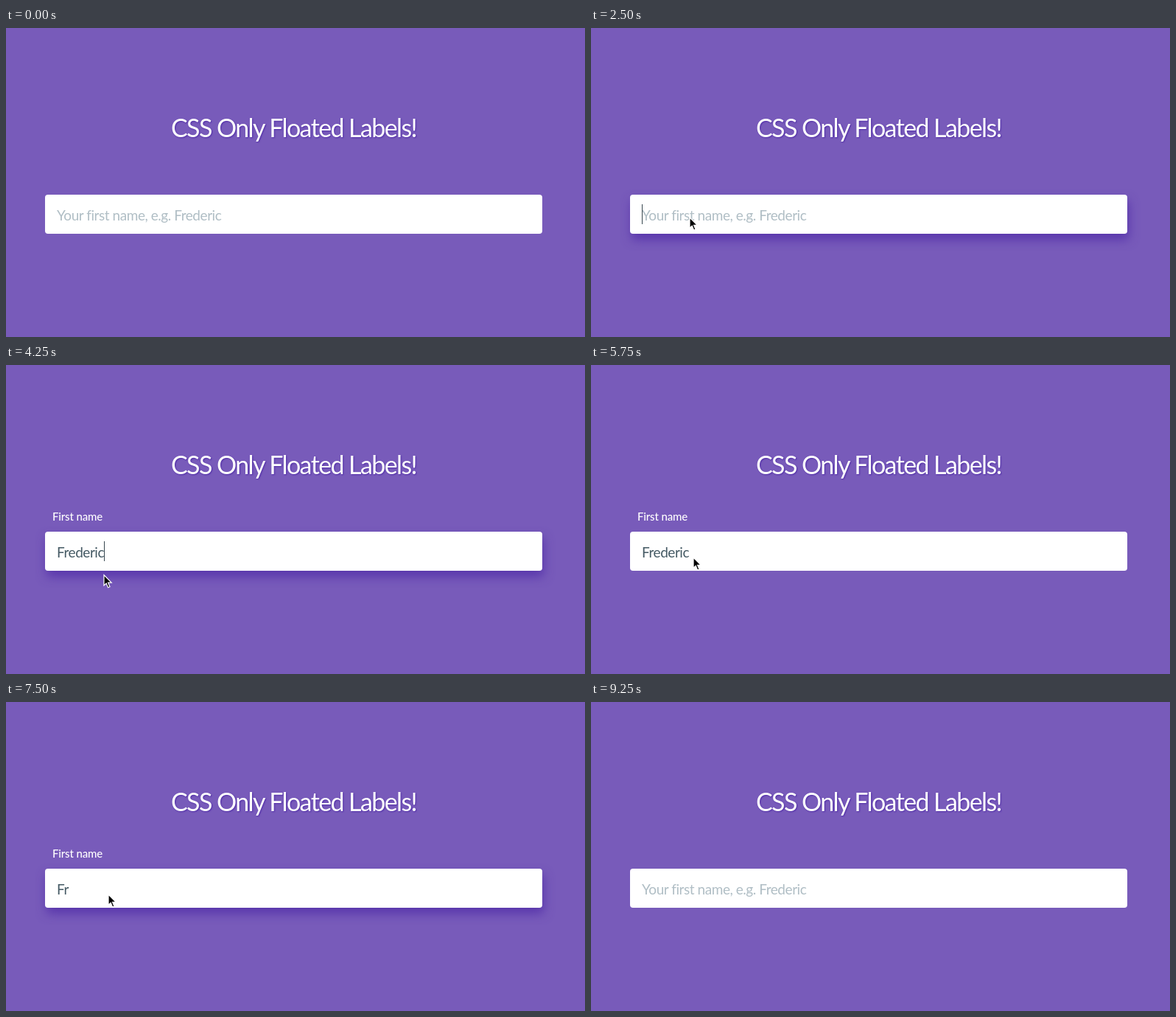
Write an HTML page that moves like this. It is 786 px wide and 419 px high and loops after 9.75 s.

```html
<!DOCTYPE html>
<html lang="en">
<head>
<meta charset="utf-8">
<title>Floated labels</title>
<style>
  html, body { margin: 0; width: 100%; height: 100%; overflow: hidden; }
  body { position: relative; background: #785bba; font-family: Lato, sans-serif; color: #fff; }
  body > *, #field > *, #caret { position: absolute; white-space: pre; }
  #title {
    left: 224px; top: 111px; font-size: 34px; line-height: 48px; letter-spacing: -1.6px;
    text-shadow: 1px 1px 2px #512da8;
  }
  #label { left: 63px; top: 195px; font-size: 15px; line-height: 20px; font-weight: 500; letter-spacing: -.15px; }
  #field {
    left: 53px; top: 226px; width: 675px; height: 53px; border-radius: 4px; background: #fff;
    font-size: 19px; line-height: 55px; letter-spacing: -.45px;
  }
  #hint, #value { left: 16px; top: 0; height: 53px; }
  #hint { color: #b0bec5; }
  #value { color: #455a64; }
  #caret { left: 100%; top: 13px; width: 1px; height: 27px; background: #37474f; }
  #cursor { left: 0; top: 0; overflow: visible; }
</style>
</head>
<body>
<div id="title">CSS Only Floated Labels!</div>
<div id="label">First name</div>
<div id="field">
  <span id="hint"></span>
  <span id="value"><span id="text"></span><i id="caret"></i></span>
</div>
<svg id="cursor" width="12" height="18">
  <path d="M0 0V14.2L3.2 11.3 5.6 17 8 16 5.6 10.4H10.2Z" stroke="#fff" stroke-width="1.2"/>
</svg>
<script>
// All times are in seconds.
const LOOP = 9.75, STEP = 0.25, NAME = 'Frederic';
const $ = id => document.getElementById(id);
const label = $('label'), field = $('field'), hint = $('hint'),
      text = $('text'), caret = $('caret'), cursor = $('cursor');
hint.textContent = `Your first name, e.g. ${NAME}`;

const ramp = (t, start, end) => Math.min(1, Math.max(0, (t - start) / (end - start)));
const smooth = p => p * p * (3 - 2 * p);
const within = (t, start, end) => t >= start && t < end;
const fade = (t, on, off) => ramp(t, on - STEP, on + STEP) - ramp(t, off - STEP, off + STEP);

const moves = [
  { start: 0.25, end: 1.25, x: 134, y: 257 },
  { start: 4, end: 4.75, x: 130, y: 364 },
  { start: 5.25, end: 5.75, x: 139, y: 261 }
];

function pointer(t) {
  let x = 335, y = 153;
  for (const move of moves) {
    const p = smooth(ramp(t, move.start, move.end));
    x += (move.x - x) * p;
    y += (move.y - y) * p;
  }
  return `translate(${x}px, ${y}px)`;
}

// The caret stays lit while typing and restarts its blink on focus.
function caretLit(t) {
  if (within(t, 2.75, 4)) return true;
  const blinkStart = [6, 4, 1.5].find(start => t >= start);
  const focused = within(t, 1.5, 5) || within(t, 6, 9);
  return focused && (t - blinkStart) % 1 < 0.5;
}

function draw(t) {
  const typed = Math.floor(NAME.length * ramp(t, 2.5, 3.75));
  const erased = Math.floor(NAME.length * ramp(t, 6.5, 7.75));
  const float = fade(t, 2.75, 7.75);
  const focus = fade(t, 1.5, 5) + fade(t, 6, 9);

  text.textContent = NAME.slice(0, typed - erased);
  hint.style.opacity = typed > erased ? 0 : 1;
  label.style.opacity = float;
  label.style.transform = `translateY(${(1 - float) * 13}px)`;
  field.style.boxShadow = `2px 8px 14px rgba(81, 45, 168, ${0.78 * focus})`;
  caret.style.opacity = +caretLit(t);
  cursor.style.opacity = +within(t, 0.25, 8.5);
  cursor.style.transform = pointer(t);
}

const begin = performance.now();
function tick() {
  const t = (performance.now() - begin) / 1000 % LOOP;
  draw(Math.floor(t / STEP) * STEP);
  requestAnimationFrame(tick);
}
tick();
</script>
</body>
</html>
```
